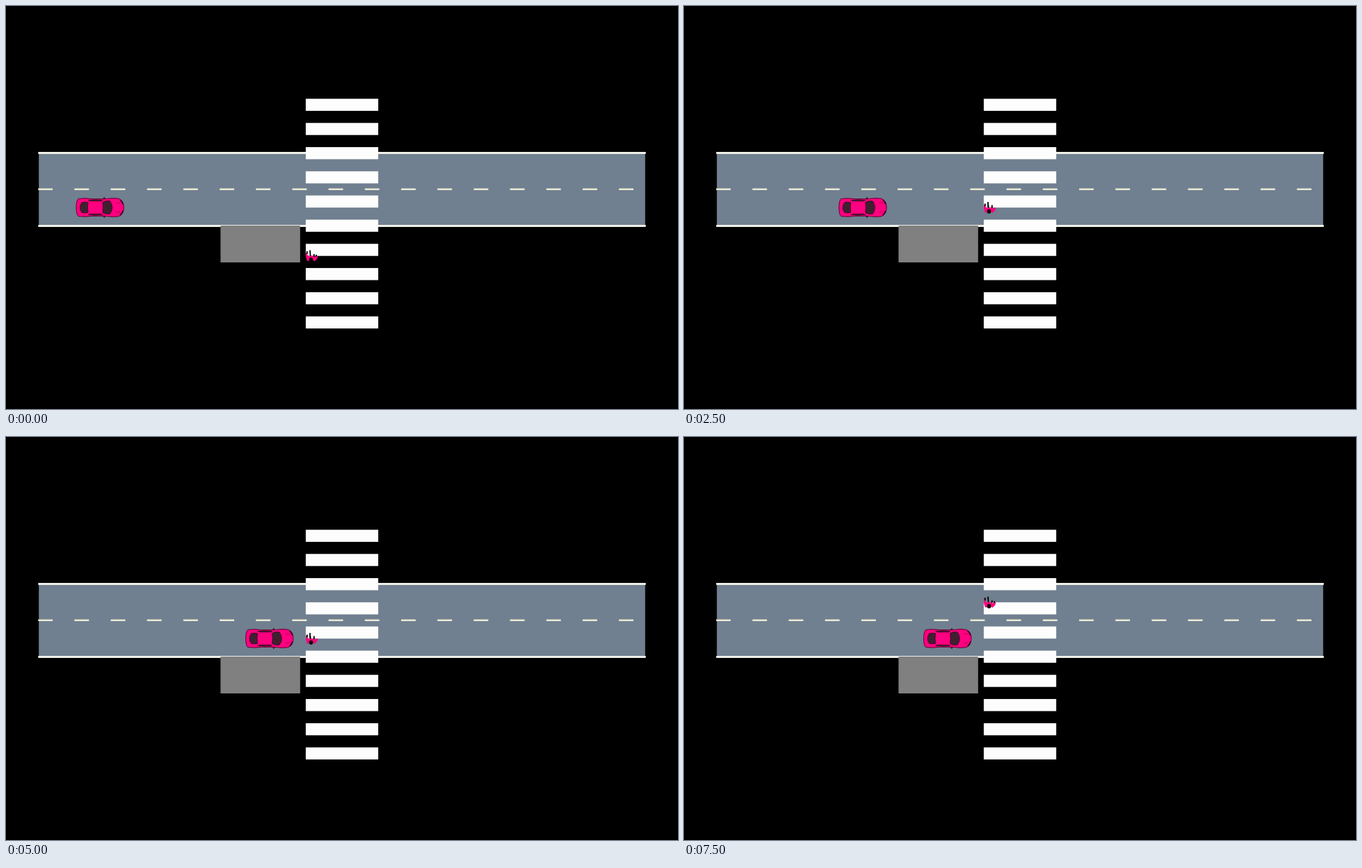
These frames come from a looping animation (966x580 px, 8 s). An HTML page:

```html
<!DOCTYPE html>
<html lang="en">
<head>
<meta charset="utf-8">
<title>Crosswalk</title>
<style>
  html, body { margin: 0; width: 100%; height: 100%; overflow: hidden; background: #000; }
  svg { display: block; width: 966px; height: 580px; }
</style>
</head>
<body>
<svg viewBox="0 0 966 580">
  <rect x="47.2" y="211" width="871.6" height="106" fill="#708090"/>
  <path d="M47.4 211.5H918.6M47.4 316.5H918.6" stroke="#f0f0ea" stroke-width="2.8" stroke-linecap="round"/>
  <path d="M46.2 263.8H919" stroke="#ebe9d4" stroke-width="2.6" stroke-dasharray="20.9 31.28"/>
  <rect x="308.4" y="316" width="114.4" height="53" fill="#808080"/>
  <g id="stripes" fill="#fdfdfd"></g>

  <g id="car">
    <!-- mirrors -->
    <path d="M39.5 3L41.3 .8L43 3ZM39.5 28L41.3 30.2L43 28Z" fill="#a00050" stroke="#400020" stroke-width=".8"/>
    <path d="M4 2.9Q14 1.6 24 3.2H43Q54 1.2 62 2.7Q69.4 5.5 69.4 15.5T62 28.3Q54 29.8 43 27.8H24Q14 29.4 4 28.1Q1 25.5 1 15.5T4 2.9Z"
      fill="#ff0080" stroke="#600030"/>
    <g fill="#402030" stroke="#400020" stroke-width=".7">
      <path d="M9 8.2Q13 7 18 8.2Q16.8 15.5 18 22.8Q13 24 9 22.8Q3.6 15.5 9 8.2Z"/>
      <path d="M39 8Q44 5 49.5 6.2Q56 15.5 49.5 24.8Q44 26 39 23Q40 15.5 39 8Z"/>
      <path d="M18 5Q28 3.8 39 4.8L37 6.3H21ZM18 26Q28 27.2 39 26.2L37 24.7H21Z"/>
    </g>
    <path d="M58 8.5L64 9.5M58 22.5L64 21.5" stroke="#b00058"/>
    <path d="M64 4.5Q67 7 68.2 11M64 26.5Q67 24 68.2 20" fill="none" stroke="#300018" stroke-width="1.5"/>
  </g>

  <g id="walker">
    <path d="M0 3.5L2.5 7.5L5 9L7 7.5L9 9L11 8L12 10.5L14 9L17 8.5Q17.5 12 14.5 14.5L12 16.5L10.5 15H5L3.5 16.5L1.5 15Q.5 12 0 9Z" fill="#ff0080"/>
    <ellipse cx="7.5" cy="14.2" rx="2.8" ry="3.2"/>
    <path id="limbs" fill="none" stroke="#000" stroke-width="1.8"/>
  </g>
</svg>
<script>
  const $ = id => document.getElementById(id);
  const CELL = 17.4, STEP = 500, LOOP = 8000;

  // Grid cells advanced by each road user at every step
  const carCells = [0, 0, 1, 2, 4, 7, 9, 11, 13, 14, 14, 14, 14, 14, 14, 14];
  const walkerCells = [0, 1, 2, 3, 4, 4, 4, 4, 4, 4, 4, 4, 5, 6, 6, 7];
  const walking = 'M1.8 2V6M6 .5L6.5 8.5M11.8 6V9.5M15 7V9.5';
  const standing = 'M1.8 3V7M6 .5V8M6.5 5V9M11.8 5V9.5';

  for (let i = 0; i < 10; i++) {
    $('stripes').innerHTML +=
      `<rect x="430.9" y="${133.5 + i * 2 * CELL}" width="104.2" height="${CELL}"/>`;
  }

  function draw(now) {
    const i = Math.floor(now % LOOP / STEP);
    $('car').setAttribute('transform', `translate(${100 + carCells[i] * CELL} 274.5)`);
    $('walker').setAttribute('transform', `translate(431 ${351 - walkerCells[i] * CELL})`);
    const moved = i === 0 || walkerCells[i] !== walkerCells[i - 1];
    $('limbs').setAttribute('d', moved ? walking : standing);
  }

  const start = performance.now();
  function tick() {
    draw(performance.now() - start);
    requestAnimationFrame(tick);
  }
  tick();
</script>
</body>
</html>
```
